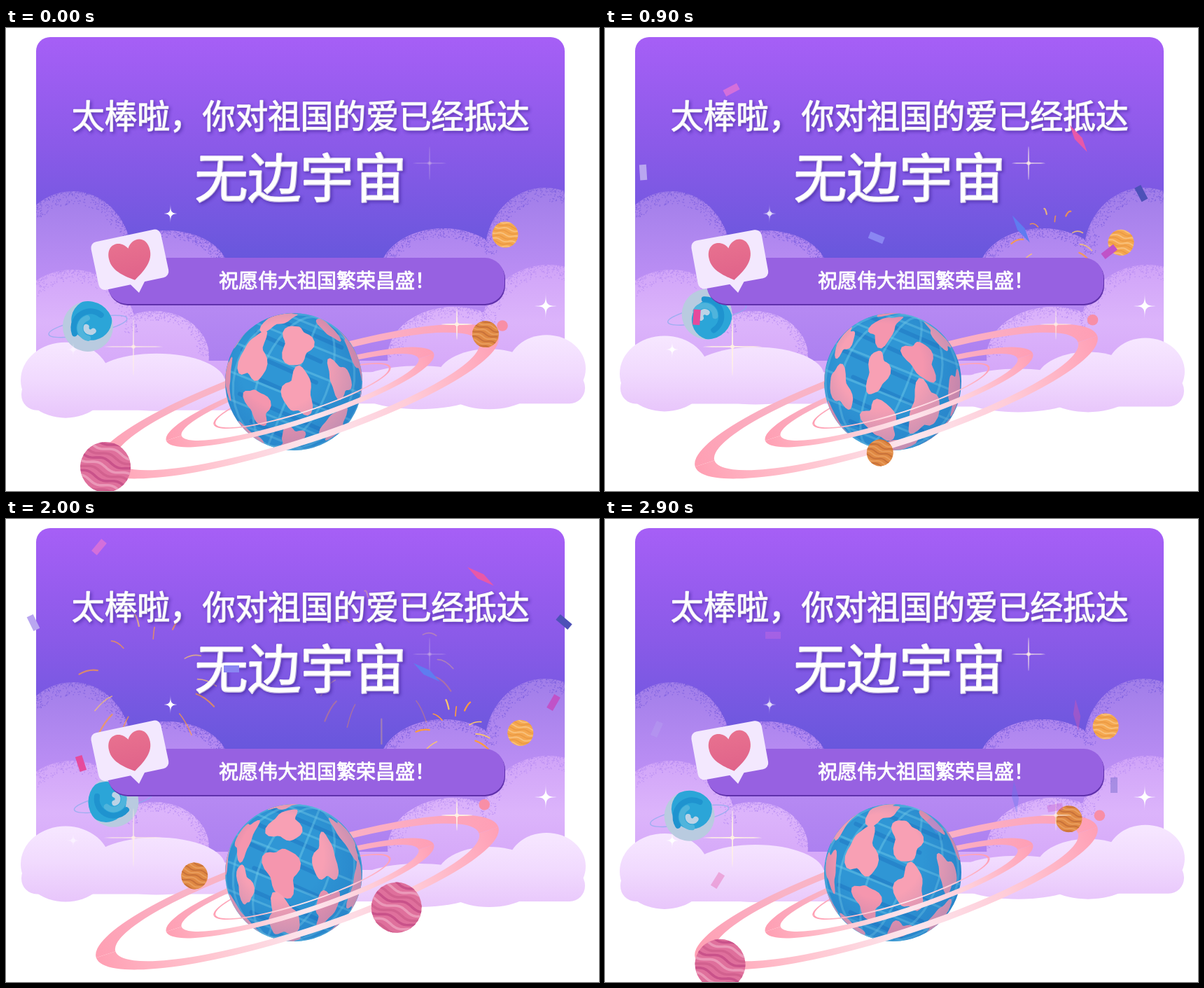
Write an HTML page with a canvas that moves like this. It is 847 px wide and 661 px high and loops after 3 s.

```html
<!DOCTYPE html>
<html lang="zh">
<head>
<meta charset="utf-8">
<style>
html, body { margin: 0; width: 100%; height: 100%; overflow: hidden; background: #fff; }
canvas { display: block; }
</style>
</head>
<body>
<canvas id="stage" width="847" height="661"></canvas>
<script>
const W = 847, H = 661, LOOP = 3000, TAU = Math.PI * 2, RAD = Math.PI / 180;
const { sin, cos, min, max, hypot } = Math;
const stage = document.getElementById('stage');
let c = stage.getContext('2d');

let seed = 7;
const random = () => (seed = (seed * 16807) % 2147483647) / 2147483647;
const clamp = v => max(0, min(1, v));
const wave = (t, period, peak) => cos(TAU * (t / period - peak));
const mix = (a, b, f) => a + (b - a) * f;
// Rises to 1 at the peak time, then returns to 0 by the end of the loop
const thereAndBack = (t, peak) => t < peak ? t / peak : (LOOP - t) / (LOOP - peak);

function gradient(x0, y0, x1, y1, ...colors) {
  const g = c.createLinearGradient(x0, y0, x1, y1);
  colors.forEach((col, i) => g.addColorStop(i / (colors.length - 1), col));
  return g;
}
function at(x, y, angle, draw) {
  c.save();
  c.translate(x, y);
  c.rotate(angle);
  draw();
  c.restore();
}
function oval(x, y, rx, ry, fill) {
  c.beginPath();
  c.ellipse(x, y, rx, ry, 0, 0, TAU);
  c.fillStyle = fill;
  c.fill();
}
const disc = (x, y, r, fill) => oval(x, y, r, r, fill);
function box(x, y, w, h, r, fill) {
  c.beginPath();
  c.roundRect(x, y, w, h, r);
  c.fillStyle = fill;
  c.fill();
}

// ---- Card and clouds ----
function grainyBank(humps, floor, fill, grain) {
  c.fillStyle = fill;
  c.fillRect(43, floor, 755, 525 - floor);
  for (const [x, y, rx, ry] of humps) {
    oval(x, y, rx, ry, fill);
    c.fillStyle = grain;
    for (let n = 0; n < rx * 6; n++) {
      const a = Math.PI * (1 + random()), k = 1 - random() ** 2 * .2;
      c.fillRect(x + rx * k * cos(a), y + ry * k * sin(a), 1.3, 1.3);
    }
  }
}
function makeBackdrop() {
  const layer = document.createElement('canvas'), screen = c;
  layer.width = W;
  layer.height = H;
  c = layer.getContext('2d');
  c.beginPath();
  c.roundRect(43, 13, 755, 519, [20, 20, 0, 0]);
  c.clip();
  box(43, 13, 755, 519, 0, gradient(0, 13, 0, 330, '#a65ff6', '#8a5ae8', '#6857dc'));
  grainyBank([[230, 348, 88, 59], [625, 352, 92, 66], [95, 325, 84, 92], [770, 322, 86, 94]], 345,
    gradient(0, 230, 0, 480, '#a17ee9', '#bb8ef4', '#ac80f0'), 'rgba(116,88,222,.6)');
  grainyBank([[212, 468, 78, 64], [640, 470, 95, 72], [95, 435, 92, 90], [775, 430, 96, 92]], 475,
    gradient(0, 340, 0, 500, '#d0a4f8', '#dcb4fb', '#d4a6f8'), 'rgba(176,132,242,.6)');
  c.fillStyle = '#5650d4';
  c.fillRect(43, 525, 755, 7);
  c = screen;
  return layer;
}
function frontCloud(x, width, humps, dy) {
  at(0, dy, 0, () => {
    const fill = gradient(0, 440, 0, 550, '#f7e8ff', '#f1dafe', '#e8c6fb');
    box(x, 495, width, 45, 22, fill);
    for (const hump of humps) oval(...hump, fill);
  });
}
function frontClouds(t) {
  frontCloud(22, 400, [[215, 500, 98, 41], [85, 497, 64, 54]], 6 * wave(t, 1500, -.05));
  frontCloud(420, 407, [[590, 517, 95, 31], [690, 505, 75, 43], [772, 490, 56, 48]], 6 * wave(t, 1500, .36));
}

// ---- Small planets ----
function ball(x, y, r, base, stripes, tilt, shift) {
  at(x, y, tilt, () => {
    disc(0, 0, r, base);
    c.clip();
    c.lineWidth = r * .1;
    for (let i = -4; i <= 4; i++) {
      c.strokeStyle = stripes[(i + 4) % stripes.length];
      c.beginPath();
      for (let u = -r; u <= r; u += 3) {
        c.lineTo(u, i * r * .23 + r * .08 * sin(u / r * 5 + i * .7 + shift));
      }
      c.stroke();
    }
  });
}
function bluePlanet(t) {
  const f = thereAndBack(t, 1600);
  at(mix(117, 168, f), mix(426, 395, f), -.2, () => {
    c.strokeStyle = 'rgba(140,172,238,.75)';
    c.lineWidth = 1.5;
    c.beginPath();
    c.ellipse(0, 0, 57, 11, 0, 0, TAU);
    c.stroke();
    disc(0, 0, 36, '#b9cbe0');
    c.clip();
    c.rotate(t / LOOP * TAU);
    disc(7, -8, 29, '#2ba5d8');
    c.lineCap = 'round';
    c.lineWidth = 8;
    ['#bcd3e6', '#4fb4dc', '#1f93cf'].forEach((color, i) => {
      c.strokeStyle = color;
      c.beginPath();
      c.arc(3, 3, 6 + i * 9, 1 + i, 3.6 + i);
      c.stroke();
    });
  });
}

// ---- Ringed globe ----
const GLOBE = 98;
// Patches follow a golden-angle spiral from pole to pole
const LAND = Array.from({ length: 24 }, (_, i) => {
  const lat = Math.asin((i + .5) / 12 - 1) / RAD;
  return { lon: i * 137.5 + 20, lat, w: (9 + 8 * random()) / max(.4, cos(lat * RAD)), h: 13 + 9 * random() };
});

function globe(t) {
  const turn = t / LOOP * 360;
  const depth = (lon, lat) => cos(lat * RAD) * cos((lon - turn) * RAD);
  const project = (lon, lat) => {
    const x = cos(lat * RAD) * sin((lon - turn) * RAD), y = sin(lat * RAD);
    const k = depth(lon, lat) < 0 ? GLOBE / hypot(x, y) : GLOBE;
    return [x * k, y * k];
  };
  at(411, 505, 22 * RAD, () => {
    disc(0, 0, GLOBE, '#2f96d5');
    c.clip();
    c.strokeStyle = 'rgba(25,108,187,.4)';
    c.lineWidth = 6;
    for (let y = -75; y < 90; y += 30) {
      c.beginPath();
      c.moveTo(-70 + y % 40, y);
      c.lineTo(45 + y % 25, y + 4);
      c.stroke();
    }
    c.strokeStyle = 'rgba(112,203,232,.45)';
    c.lineWidth = 3.2;
    for (let lon = 0; lon < 360; lon += 30) {
      if (depth(lon, 0) < 0) continue;
      c.beginPath();
      for (let lat = -90; lat <= 90; lat += 10) c.lineTo(...project(lon, lat));
      c.stroke();
    }
    for (let lat = -60; lat < 80; lat += 24) {
      const x = GLOBE * cos(lat * RAD), y = GLOBE * sin(lat * RAD);
      c.beginPath();
      c.moveTo(-x, y);
      c.lineTo(x, y);
      c.stroke();
    }
    LAND.forEach(({ lon, lat, w, h }, i) => {
      if (depth(lon, lat) < -.3) return;
      c.beginPath();
      for (let a = 0; a < TAU; a += .2) {
        const k = 1 + .2 * sin(3 * a + i * 2) + .1 * sin(5 * a + i);
        c.lineTo(...project(lon + w * k * cos(a), lat + h * k * sin(a + .35)));
      }
      c.fillStyle = i % 3 ? '#f8a0b4' : '#f596ae';
      c.fill();
    });
    const shade = c.createRadialGradient(-25, -15, 60, -10, -5, 112);
    shade.addColorStop(0, 'rgba(20,80,170,0)');
    shade.addColorStop(1, 'rgba(20,80,170,.25)');
    disc(0, 0, GLOBE, shade);
  });
}
// Each ring: centre, outer radii, inner radii
const RINGS = [[416, 533, 302, 62, 273, 53], [420, 527, 201, 37, 178, 30], [423, 525, 133, 24, 130, 22]];
function rings(front) {
  for (const [x, y, a, b, a2, b2] of RINGS) {
    at(x, y, -18 * RAD, () => {
      c.beginPath();
      c.rect(-310, front ? 0 : -100, 620, 100);
      c.clip();
      c.beginPath();
      c.ellipse(0, 0, a, b, 0, 0, TAU);
      c.ellipse(0, 0, a2, b2, 0, 0, TAU);
      c.fillStyle = gradient(-a, 0, a, 0, '#ff9fb3', front ? '#ffc5d0' : '#f9b3c6',
        front ? '#fce6ed' : '#fab4c6', front ? '#ffccd8' : '#fbadc3', '#ff9fb5');
      c.fill('evenodd');
    });
  }
}
// Position relative to the orbit centre; the two moons stay opposite each other
function orbit(t) {
  const angle = (180 + .12 * t - 5 + 9 * wave(t - 400, 1500, 0)) * RAD;
  const u = 289 * cos(angle), v = (66 + 8 * wave(t - 500, 1500, 0)) * sin(angle);
  return { x: .951 * u + .309 * v, y: .951 * v - .309 * u, front: v > -12 };
}
function planetSystem(t) {
  const spin = t / LOOP * TAU;
  const pink = orbit(t), orange = orbit(t + 1500);
  const drawMoons = front => {
    if (pink.front === front) {
      ball(413.5 + pink.x, 532 + pink.y, 36, '#df709c', ['#c9528a', '#eb98b8', '#d2618f'], .35, spin);
    }
    if (orange.front === front) {
      ball(413.5 + orange.x, 532 + orange.y, 19, '#df8843', ['#c8713a', '#e99d5c'], .3, spin);
    }
  };
  rings(false);
  drawMoons(false);
  globe(t);
  rings(true);
  drawMoons(true);
}
function driftingDots(t) {
  const f = thereAndBack(t, 1350), g = thereAndBack(t, 1950);
  ball(mix(713, 749, f), mix(295, 312, f), 18.5, '#f5a850', ['#f9c17c', '#ec9b45'], .2, t / LOOP * TAU);
  disc(mix(709, 682, g), mix(425, 407, g), 7.8, '#f88ea6');
}

// ---- Text, banner, speech bubble ----
function label(text, x, y, size) {
  c.font = `400 ${size}px "Noto Sans CJK SC", "Noto Sans CJK", sans-serif`;
  c.fillStyle = c.strokeStyle = '#fff';
  c.lineWidth = size * .034;
  c.lineJoin = 'round';
  c.strokeText(text, x, y);
  c.fillText(text, x, y);
}
function titles() {
  c.save();
  c.shadowColor = 'rgba(62,32,150,.5)';
  c.shadowBlur = 4;
  c.shadowOffsetX = c.shadowOffsetY = 2;
  label('太棒啦，你对祖国的爱已经抵达', 94, 143, 46.7);
  label('无边宇宙', 270, 242, 75.5);
  c.restore();
}
function banner() {
  box(146, 330, 567, 66, 28, '#5f31ab');
  box(145, 328, 567, 66, 28, '#9761e1');
  label('祝愿伟大祖国繁荣昌盛！', 304, 371, 28);
}
function bubble(t) {
  at(190, 378, (-3.4 - 8.6 * wave(t, 1000, 0)) * RAD, () => {
    box(-54, -84, 102, 70, 9, '#f3e8fe');
    c.beginPath();
    c.moveTo(-10, -15);
    c.lineTo(0, 0);
    c.lineTo(12, -15);
    c.fill();
    c.translate(-2, -48);
    c.beginPath();
    for (const side of [-1, 1]) {
      c.moveTo(0, -17);
      c.bezierCurveTo(8 * side, -32, 30 * side, -31, 30 * side, -8);
      c.bezierCurveTo(30 * side, 11, 10 * side, 22, 0, 29);
    }
    c.fillStyle = gradient(0, -28, 0, 28, '#e8718f', '#e0638a');
    c.fill();
  });
}

// ---- Sparkles, fireworks, confetti ----
// Position, radius, moment of full brightness within each second
const STARS = [[235, 265, 18, .13], [771, 397, 24, .03], [96, 459, 17, .72]];
const GLINTS = [[182, 455, 42, .8], [644, 423, 22, .12], [605, 193, 24, .7]];
function sparkles(t) {
  const glow = peak => clamp(.45 + .8 * wave(t, 1000, peak));
  for (const [x, y, r, peak] of STARS) {
    c.globalAlpha = glow(peak);
    at(x, y, 0, () => {
      c.beginPath();
      c.moveTo(r, 0);
      for (let i = 1; i <= 4; i++) {
        const a = i * TAU / 4;
        c.bezierCurveTo(0, 0, 0, 0, r * cos(a), r * sin(a));
      }
      c.fillStyle = '#fff';
      c.fill();
      disc(0, 0, r * .17, '#fff');
    });
  }
  for (const [x, y, r, peak] of GLINTS) {
    c.globalAlpha = glow(peak);
    oval(x, y, r, .9, '#fff1e4');
    oval(x, y, .9, r, '#fff1e4');
    disc(x, y, 2.8, '#fff1e4');
  }
  c.globalAlpha = 1;
}

// Centre, reach, launch times
const FIREWORKS = [[206, 222, 125, 270, 1520], [536, 192, 130, 120, 1450], [640, 303, 75, 445, 1630]];
function fireworks(t) {
  const rays = 13, life = 620;
  c.lineCap = 'round';
  for (const [x, y, reach, ...launches] of FIREWORKS) {
    for (const launch of launches) {
      const age = t - launch;
      if (age <= 0 || age > life) continue;
      const r = reach * (1 - Math.exp(-age / 280)), drop = age * age / 14000;
      const length = min(r * .7, reach * .26) * clamp((850 - age) / 450);
      c.globalAlpha = clamp((life - age) / 200);
      for (let i = 0; i < rays; i++) {
        const a = i / rays * TAU + .18 * sin(i * 5), far = r * (.92 + .1 * sin(i * 3)), near = far - length;
        c.strokeStyle = i % 3 ? '#ff9c3d' : '#fbc66c';
        c.lineWidth = i % 2 ? 2.2 : 1.6;
        c.beginPath();
        c.moveTo(x + near * cos(a), y + near * sin(a) + drop * .4);
        c.quadraticCurveTo(x + (near + far) / 2 * cos(a), y + (near + far) / 2 * sin(a) + drop * .4,
          x + far * cos(a), y + far * sin(a) + drop);
        c.stroke();
      }
    }
  }
  c.globalAlpha = 1;
}

// Colour, first position, travel, first angle; every fourth piece is a diamond
const CONFETTI = [
  ['#e858a8', 678, 82, -4, 198, -55],
  ['#d46fdb', 133, 40, 107, 126, 40],
  ['#b9a6f0', 39, 148, 35, 152, -26],
  ['#4d51b8', 797, 147, -70, 233, -50],
  ['#5f7cf0', 601, 219, -15, 178, -55],
  ['#e64a9c', 107, 349, 54, 167, -18],
  ['#c052c8', 782, 262, -139, 150, 30],
  ['#8a86f2', 322, 214, 148, 223, -90]
];
function confetti(t) {
  const p = t % 1500, fall = (p - 500) / 900;
  c.globalAlpha = clamp((p - 60) / 400) * clamp((1520 - p) / 350);
  CONFETTI.forEach(([color, x, y, dx, dy, angle], i) => {
    at(x + dx * fall, y + dy * fall * (.75 + .25 * fall), (angle + 50 * fall) * RAD, () => {
      if (i % 4) return box(-5, -11, 10, 22, 0, color);
      c.beginPath();
      c.moveTo(0, -23);
      c.lineTo(5, 2);
      c.lineTo(0, 23);
      c.lineTo(-5, -2);
      c.fillStyle = color;
      c.fill();
    });
  });
  c.globalAlpha = 1;
}

const backdrop = makeBackdrop();
function draw(t) {
  c.fillStyle = '#fff';
  c.fillRect(0, 0, W, H);
  c.drawImage(backdrop, 0, 0);
  frontClouds(t);
  fireworks(t);
  titles();
  bluePlanet(t);
  banner();
  bubble(t);
  planetSystem(t);
  driftingDots(t);
  sparkles(t);
  confetti(t);
}

const start = performance.now();
(function tick() {
  const t = max(0, performance.now() - start) % LOOP;
  draw(Math.floor(t / 100) * 100);
  requestAnimationFrame(tick);
})();
</script>
</body>
</html>
```
